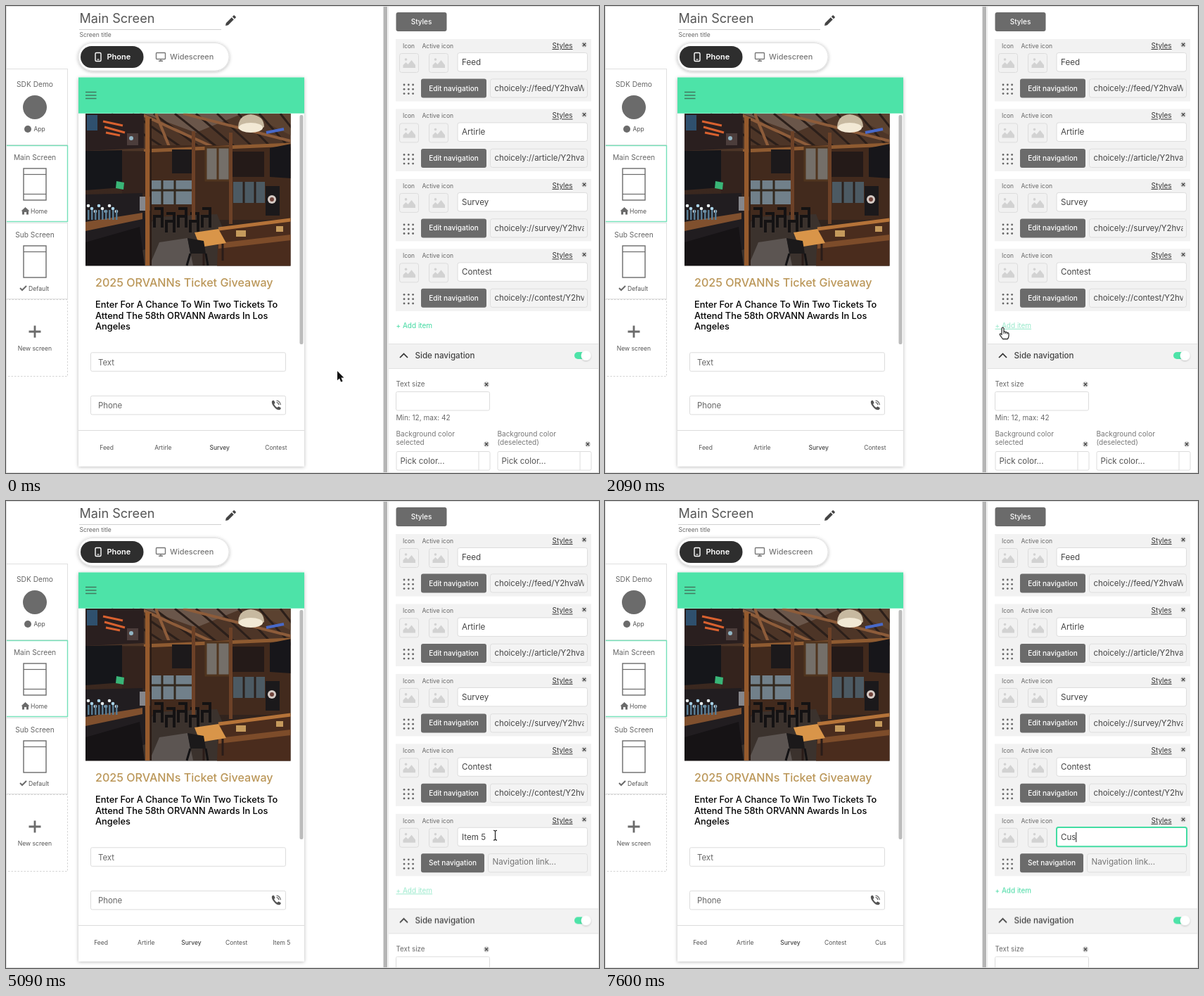
An HTML page for the animation above (8000 ms loop, 843 by 664 pixels).

```html
<!DOCTYPE html>
<html lang="en">
<head>
<meta charset="utf-8">
<title>Screen editor</title>
<style>
  html, body { margin: 0; width: 100%; height: 100%; overflow: hidden; background: #fff; }
  svg { display: block; }
  text { font-family: Inter, "Liberation Sans", sans-serif; white-space: pre; }
  .step { animation: 8s step-end infinite; }
  .lower { animation-name: push; }
  .arrow { animation-name: travel; }
  @keyframes push { 0% { transform: none; } 38%, 100% { transform: translateY(99.4px); } }
  @keyframes travel {
    0% { transform: translate(471px, 519px); }
    1.25% { transform: translate(503px, 497px); }
    13.625%, 100% { transform: translate(545px, 467px); }
  }
</style>
</head>
<body>
<script>
const LOOP = 8000;
const GREEN = '#4de3a8', DARK = '#6b6b6b', LINE = '#dcdcdc', PITCH = 99.45;
const ADD = 3040, HOVER = 2090, POINT = 5090, FOCUS = 6020, CLEAR = 6600, TYPED = 7600;
const rules = [];

// Shows its content only between two times of the loop
function during(from, to, body) {
  const name = `show${from}to${to}`;
  const pct = ms => ms / LOOP * 100 + '%';
  rules.push(`@keyframes ${name} { 0% { opacity: 0 } ${pct(from)} { opacity: 1 } ${pct(to)} { opacity: ${to < LOOP ? 0 : 1} } }`);
  return `<g class="step" style="animation-name:${name}">${body}</g>`;
}

const text = (x, y, size, str, fill = '#555', more = '') =>
  `<text x="${x}" y="${y}" font-size="${size}" fill="${fill}" ${more}>${str}</text>`;
const mid = (x, y, size, str, fill, more = '') =>
  text(x, y, size, str, fill, 'text-anchor="middle" ' + more);
const box = (x, y, w, h, fill, stroke = 'none', r = 0, more = '') =>
  `<rect x="${x}" y="${y}" width="${w}" height="${h}" rx="${r}" fill="${fill}" stroke="${stroke}" ${more}/>`;
const dot = (x, y, r, fill, more = '') => `<circle cx="${x}" cy="${y}" r="${r}" fill="${fill}" ${more}/>`;
const line = (d, stroke, w = 1, more = '') =>
  `<path d="${d}" fill="none" stroke="${stroke}" stroke-width="${w}" ${more}/>`;
const shape = (d, fill, more = '') => `<path d="${d}" fill="${fill}" ${more}/>`;
const at = (x, y, body) => `<g transform="translate(${x} ${y})">${body}</g>`;
const repeat = (n, part) => Array.from({ length: n }, (_, i) => part(i)).join('');
const MEDIUM = 'font-weight="500"';

function leftCards() {
  const card = (y, name, base) =>
    box(-.5, y + .5, 88, 108, '#fff', '#e0e0e0') + mid(41, base, 10.2, name, '#666');
  const screen = y => box(25, y, 32, 45, '#fff', DARK, 0, 'stroke-width="1.4"') +
    line(`M25 ${y + 8.5}h32`, DARK, 1.2);
  return card(89, 'SDK Demo', 115) + dot(41, 144, 17, DARK) + dot(31, 175, 5, DARK) + text(39.5, 178, 8.5, 'App') +
    card(308, 'Sub Screen', 328.7) + screen(341) +
    line('M20 401l3 3 6-6', DARK, 2) + text(32, 404.5, 8.6, 'Default') +
    card(198, 'Main Screen', 219) + screen(231) + line('M25 267.5h32', DARK, 1.2) +
    shape('M21.5 291.5l6-5.5 6 5.5h-1.5v5h-3v-3.5h-3v3.5h-3v-5z', DARK) + text(35, 294.5, 8.6, 'Home') +
    box(-.5, 198.5, 88, 108, 'none', '#74e0b8', 0, 'stroke-width="1.4"') +
    box(-.5, 417.5, 88, 109, 'none', '#d4d4d4', 0, 'stroke-dasharray="2.5 2"') +
    line('M32.5 463h17M41 454.5v17', DARK, 2.8) + mid(41, 489.5, 8.6, 'New screen');
}

function header() {
  return text(104.5, 24, 18.1, 'Main Screen') + line('M104 33.5h202', '#d0d0d0') +
    text(104.5, 44, 8.5, 'Screen title', '#666') +
    shape('M312 28l.8-3.8 8-8 3 3-8 8zM321.8 15.2l1.6-1.6q.8-.5 1.5 0l1.7 1.7q.5.7 0 1.4l-1.7 1.6z', '#444') +
    box(103, 52.5, 214, 39.5, '#fff', '#e2e2e2', 20, 'filter="url(#soft)"') +
    box(106, 57, 89.5, 31, '#2e2e2e', 'none', 15.5) +
    box(127, 66.5, 8, 12, 'none', '#fff', 1.5, 'stroke-width="1.4"') + line('M129.5 76h3', '#fff', 1.2) +
    text(143.5, 76, 11, 'Phone', '#fff', 'font-weight="600"') +
    box(213.5, 66.5, 13, 9, 'none', '#777', 1, 'stroke-width="1.4"') + line('M217 78.3h6M220 76v2', '#777', 1.4) +
    text(233, 76, 10.9, 'Widescreen', '#777', MEDIUM);
}

// A bar interior in flat tones
function photo() {
  const planks = repeat(9, i => line(`M${150 + i * 30} 153L${232 + i * 25} 206`, '#2b1f1a', 3));
  const taps = repeat(9, i =>
    dot(117 + i * 5, 284 + i % 3 * 4, 2.3, i % 2 ? '#a9d3e8' : '#e8eef0') +
    box(116 + i * 5, 290, 2.5, 14, '#587b92'));
  const stools = repeat(5, i =>
    line(`M${211 + i * 17} ${288 + i % 2 * 7}h11v11h-11v16m11-16v16`, '#141213', 4));
  return `<g clip-path="url(#photo)">` +
    box(113, 153, 292, 217, 'url(#room)') +
    shape('M113 153H405V198L206 206 113 206z', '#4d3527') +
    shape('M196 153H336L270 180z', '#6a564a') + shape('M345 153H405V184z', '#5b4230') + planks +
    line('M190 153L300 203M252 153L405 192M213 153L232 200', '#8d5c3a', 4) +
    box(206, 198, 199, 106, '#422a1d') + line('M196 206L405 197', '#8f5b31', 5) +
    box(206, 248, 58, 34, '#71808a') + line('M222 248v34M240 248v34M206 262h58', '#33291f', 3) +
    box(323, 250, 45, 30, '#4c5a63') + line('M338 250v30M354 250v30', '#2b211d', 3) +
    box(284, 201, 34, 47, '#746f69', '#50351f', 0, 'stroke-width="3"') + line('M301 201v47', '#50351f', 3) +
    box(236, 204, 28, 34, '#1c191b') + box(322, 207, 45, 36, '#241a18') +
    shape('M375 202L405 196V245L375 243z', '#17161a') +
    shape('M113 206L165 205V258L113 262z', '#15161a') + box(165, 207, 33, 60, '#34231d') +
    shape('M113 153H196V202L113 206z', '#2a1f1f') +
    box(115, 155, 15, 22, '#2f506e') + line('M138 164l28 6M140 172l29 8M142 180l20 4', '#d8612f', 3) +
    box(172, 181, 16, 17, '#4c3d3b') + dot(178, 188, 3, '#91b5c4') +
    shape('M166 369L212 300 300 296 330 369z', '#3b322d') + shape('M204 369L218 336 258 330 266 369z', '#5c5552') + stools +
    shape('M113 268L194 266 202 345 113 369z', '#211d20') +
    shape('M113 307L194 294V303L113 320z', '#80502e') + taps +
    shape('M113 336L190 314 197 369H113z', '#161315') +
    box(190, 271, 16, 20, '#85868b') + box(198, 158, 6.5, 211, '#955a2d') + box(204.5, 160, 2.5, 209, '#2a1b15') +
    box(264, 178, 5, 126, '#6c4127') + box(317, 180, 5, 130, '#6c4127') +
    shape('M157 249l11 2-1 10-11-2z', '#39b577') +
    box(369, 256, 20, 42, '#1b191b') + dot(378, 275, 6, '#d6cbc5') + dot(378, 275, 3, '#71453c') +
    shape('M302 316L405 303V370H300z', '#4a2c1d') + line('M302 317L405 304', '#b57339', 5) +
    shape('M302 337L405 325V333L302 345z', '#7d4c2a') + box(327, 319, 14, 9, '#c59a5c') + box(384, 313, 10, 8, '#c59a5c') +
    shape('M268 322L302 317 313 337 276 343z', '#d99549') + line('M281 343v26M308 338v24', '#2a1c18', 3) +
    shape('M258 330l4 22h22l-3-18z', '#1b191a') + line('M262 352l-5 17M284 352l3 17', '#131214', 3) +
    shape('M330 174q0-19 18-20 19 2 19 18-18 12-37 2z', '#c7b9a0') +
    `<ellipse cx="348" cy="173" rx="17" ry="7" fill="#f2e9d5"/>` + line('M370 180l25-5', '#4869c8', 4) +
    '</g>';
}

function tabs(names) {
  const w = 321 / names.length;
  return names.map((name, i) => mid(103 + w * (i + .5), 631.3, 8.5, name,
    name === 'Survey' ? '#444' : '#555', name === 'Survey' ? MEDIUM : '')).join('');
}

function phone() {
  const names = ['Feed', 'Artirle', 'Survey', 'Contest'];
  const fifth = name => mid(391.9, 631.3, 8.5, name);
  const field = (y, label) => box(120.5, y, 277, 26.5, '#fff', LINE, 2) + text(131, y + 18, 11.4, label, '#666');
  return box(103, 101.5, 321, 553, '#fff', 'none', 0, 'filter="url(#soft)"') +
    box(103, 101.5, 321, 51.2, GREEN) + line('M113 122.5h15.5M113 127h15.5M113 131.5h15.5', '#43785f', 1.5) +
    photo() + box(417.5, 155, 5, 326, '#bcbcbc', 'none', 2) +
    text(127, 399.3, 16.1, '2025 ORVANNs Ticket Giveaway', '#bb9759', MEDIUM) +
    ['Enter For A Chance To Win Two Tickets To', 'Attend The 58th ORVANN Awards In Los', 'Angeles']
      .map((s, i) => text(127, 429 + i * 15.5, 12.8, s, '#000', MEDIUM)).join('') +
    field(492.8, 'Text') + field(554.4, 'Phone') +
    shape('M378 562q1.5-2 3-1l1.5 3q0 1-1.5 2 1.5 3.5 4.5 5 1-1.5 2-1.5l3 1.5q1 1.5-1 3-3.5 1.5-8-3.5-4.5-5-3.5-8.5z', '#555') +
    line('M384.5 563.5q3 .5 3.5 3.7M384.5 561q5 .5 6 6.2', '#555', 1.1) +
    line('M103 603.5h321', LINE) +
    during(0, ADD, tabs(names)) +
    during(ADD, LOOP, tabs([...names, ''])) +
    during(ADD, CLEAR, fifth('Item 5')) + during(TYPED, LOOP, fifth('Cus'));
}

const close = (x, y) => dot(x, y, 4.2, '#dedede') +
  line(`M${x - 2.2} ${y - 2.2}l4.4 4.4m0-4.4l-4.4 4.4`, '#444', 1.3);

const thumb = x => box(x, 67.5, 27, 27, '#f1f1f1', '#dcdcdc', 3) +
  shape(`M${x + 5} 88v-4l4-4 3 3 5-6 5.5 7v4z`, '#d2d2d2') + dot(x + 9, 76, 1.8, '#d2d2d2');

function row(i, title, link) {
  const w = link ? 93 : 90;
  const grip = repeat(9, n => dot(566 + n % 3 * 6.3, 112 + Math.floor(n / 3) * 6.3, 1.4, '#666'));
  return at(0, i * PITCH, box(554, 47, 278, 88.5, '#f2f2f2') +
    mid(572.5, 59.8, 8.4, 'Icon', '#666') + text(591.5, 59.8, 8.5, 'Active icon', '#666') +
    text(776.5, 60, 10, 'Styles', '#333', 'text-decoration="underline"') + close(822, 55) +
    thumb(559.5) + thumb(601.5) + box(642, 66.5, 184.5, 26.5, '#fff', LINE, 3) +
    text(648, 83.7, 11.6, title, '#444') + grip +
    box(590, 103.5, w, 27, DARK, 'none', 3) +
    mid(590 + w / 2, 120.5, 10, link ? 'Edit navigation' : 'Set navigation', '#fff', MEDIUM) +
    box(595.5 + w, 103.8, 231 - w, 26.2, '#f3f3f3', '#dedede', 3) +
    (link
      ? `<g clip-path="url(#link)">${text(694.5, 121, 11.4, `choicely://${link}/Y2hvaWNl`, '#444')}</g>`
      : text(691.5, 119.3, 11.6, 'Navigation link...', '#757575')));
}

function lower() {
  const input = (x, y) => box(x + .5, y + .5, 133, 26.5, '#fff', LINE, 2);
  const picker = (x, note) => text(x, 612.3, 10, 'Background color', '#777') + text(x, 624.3, 10, note, '#777') +
    close(x + 128.5, 623) + input(x, 633) + line(`M${x + 117.5} 633v27`, LINE) + text(x + 6, 650.8, 11.5, 'Pick color...');
  const link = (fill, more) => text(554.5, 457.8, 10, '+ Add item', fill, more);
  const rest = '#3fd9a0';
  return `<g class="step lower">` +
    during(0, HOVER, link(rest, '')) +
    during(HOVER, FOCUS, link('#98e9cb', 'text-decoration="underline"')) +
    during(FOCUS, LOOP, link(rest, '')) +
    box(544, 480, 299, 35, '#f2f2f2') + line('M544 480.5h299M544 515.5h299', '#e2e2e2') +
    line('M560 500l5.5-5.5 5.5 5.5', '#333', 1.7) + text(581.5, 501, 11.6, 'Side navigation', '#444', MEDIUM) +
    box(808, 492, 20, 10, GREEN, 'none', 5) + dot(824.5, 497, 7, '#fff', 'filter="url(#knob)"') +
    text(554.5, 540.5, 9.8, 'Text size', '#666') + close(683, 538) + input(554, 548) +
    text(554.5, 588.8, 10, 'Min: 12, max: 42', '#666') +
    picker(554.5, 'selected') + picker(698.5, '(deselected)') + '</g>';
}

function panel() {
  const y = 83.7 + 4 * PITCH;
  const title = str => text(648, y, 11.6, str, '#444');
  return box(536.5, 0, 5.5, 664, '#b5b5b5') + box(542, 0, 301, 664, '#fff') + line('M543.5 0v664', '#e6e6e6') +
    box(554.5, 9, 72, 27, DARK, 'none', 3) + mid(590.5, 26, 10, 'Styles', '#fff', MEDIUM) +
    row(0, 'Feed', 'feed') + row(1, 'Artirle', 'article') + row(2, 'Survey', 'survey') + row(3, 'Contest', 'contest') +
    lower() +
    during(ADD, LOOP, row(4, '', '')) +
    during(FOCUS, LOOP, box(642, 464, 185, 27.3, '#fff', '#43dca3', 2.5, 'stroke-width="2"')) +
    during(ADD, CLEAR, title('Item 5')) + during(TYPED, LOOP, title('Cus')) +
    during(CLEAR, TYPED, line('M648.5 471v14', '#222')) + during(TYPED, LOOP, line('M669.8 471v14', '#222'));
}

function cursors() {
  const arrow = shape('M0 0V13.2L3 10.5 5.2 15.5 7.6 14.5 5.4 9.6H9.4z', '#111',
    'stroke="#fff" stroke-width="1" paint-order="stroke"');
  const hand = shape('M-3.5 2.5V-6q0-1.8 1.5-1.8T-.5-6v4.2q1.6-.8 2.4.6 1.8-.6 2.4.8 2-.3 2.2 1.6V4q0 2.5-1.8 4.5H-2L-6 2.8q-.8-1.6.6-2 1.1 0 1.9 1.7z',
    '#fff', 'stroke="#333" stroke-width="1.3" stroke-linejoin="round"') + line('M-.5-1.8v3M1.9-1v2.2M4.3-.3v2', '#333');
  const beam = line('M-2.5-7q2 0 2.5 1.2Q.5-7 2.5-7M0-5.8V5.8M-2.5 7Q-.5 7 0 5.8 .5 7 2.5 7', '#222', 1.2);
  return during(0, HOVER, `<g class="step arrow">${arrow}</g>`) +
    during(HOVER, POINT, at(567.5, 465, hand)) +
    during(POINT, CLEAR, at(695.5, 475.3, beam));
}

const shadow = (id, blur, alpha) => `<filter id="${id}" x="-20%" y="-20%" width="140%" height="140%">` +
  `<feDropShadow dx="0" dy="1" stdDeviation="${blur}" flood-opacity="${alpha}"/></filter>`;

const scene = leftCards() + header() + phone() + panel() +
  box(.5, .5, 842, 663, 'none', '#dedede') + cursors();

document.body.innerHTML = `<svg width="843" height="664" viewBox="0 0 843 664"><defs>
  ${shadow('soft', 2.8, .28)}${shadow('knob', 1, .22)}
  <clipPath id="photo">${box(113, 152.7, 291.5, 216.8, '#000')}</clipPath>
  <clipPath id="link">${box(690, 100, 131.5, 34, '#000')}</clipPath>
  <linearGradient id="room" x2="0" y2="1"><stop stop-color="#38281f"/><stop offset=".5" stop-color="#3b281f"/><stop offset="1" stop-color="#241d1b"/></linearGradient>
  </defs>${scene}</svg>`;
document.head.appendChild(document.createElement('style')).textContent = rules.join('\n');
</script>
</body>
</html>
```
